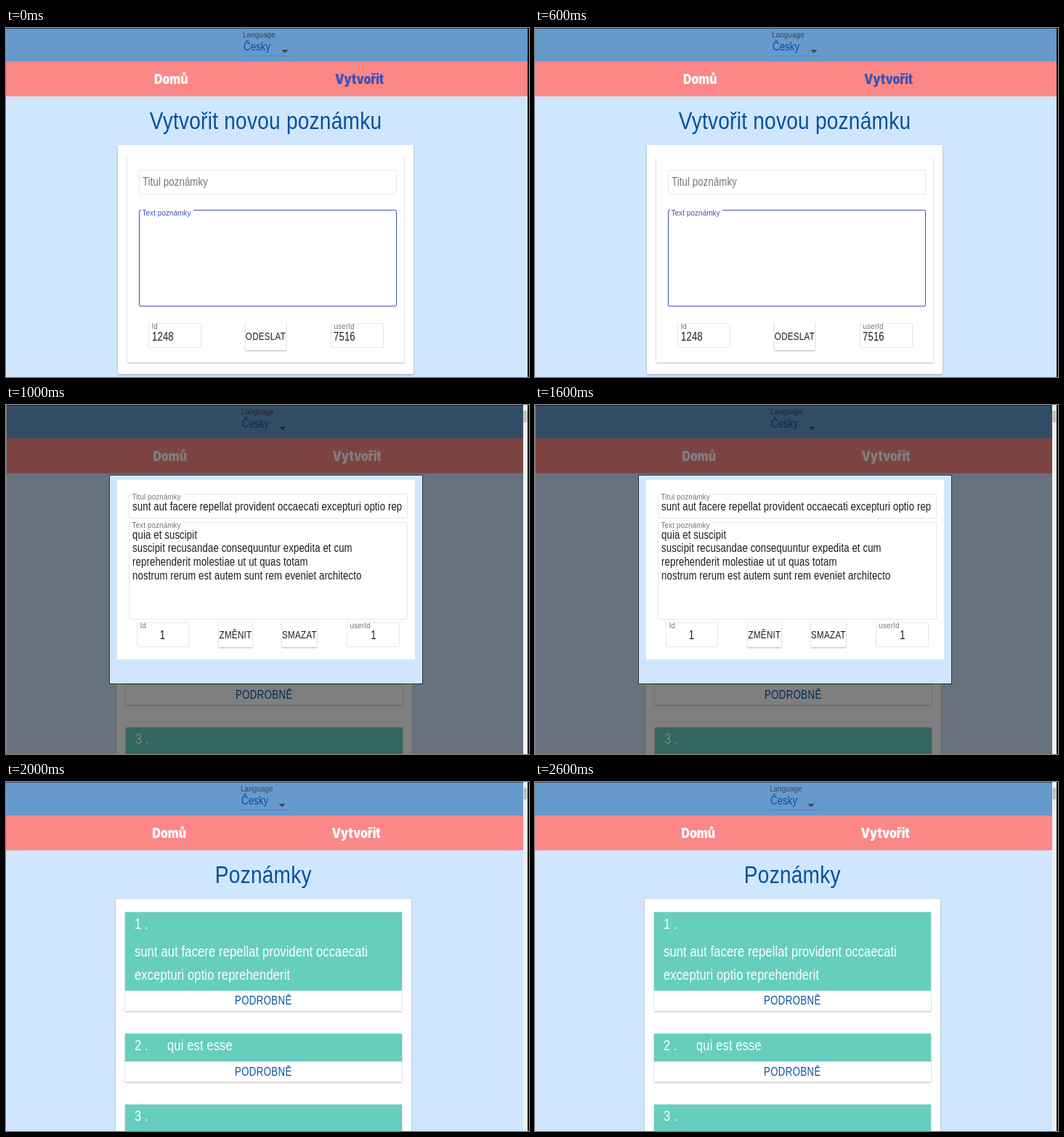
Write an HTML page that moves like this. It is 720 px wide and 480 px high and loops after 3 s.

```html
<!DOCTYPE html>
<html lang="cs">
<head>
<meta charset="utf-8">
<style>
  html, body { margin: 0; width: 100%; height: 100%; overflow: hidden; }
  svg { display: block; font-family: "Liberation Sans", Arial, sans-serif; }
  text { letter-spacing: .009em; white-space: pre; }
  .nav { font-family: Inter, sans-serif; font-weight: 900; letter-spacing: 0; }
  .button { letter-spacing: .0286em; }
  .mid { text-anchor: middle; }
  .paper { filter: drop-shadow(0 1px .8px rgba(0, 0, 0, .3)); }
</style>
</head>
<body>
<svg id="stage" width="720" height="480" viewBox="0 0 720 480"></svg>
<script>
const SKY = '#d0e6fe', BLUE = '#07519c', INDIGO = '#3f51b5', GREEN = '#66cebc';
const INK = '#1c1c1c', GRAY = '#757575', LINE = '#e6e6e6';

const rect = (x, y, w, h, fill, extra = '') =>
  `<rect x="${x}" y="${y}" width="${w}" height="${h}" fill="${fill}" ${extra}/>`;
const paper = (x, y, w, h) => rect(x, y, w, h, '#fff', 'class="paper"');

// The page is shown slightly narrowed, so all type shares one scale.
const text = (x, y, str, size, fill, cls = '') =>
  `<text transform="translate(${x} ${y}) scale(.825 .98)" font-size="${size}" fill="${fill}" class="${cls}">${str}</text>`;

function field(x, y, w, h, label = '', labelWidth = 0, color = LINE, labelColor = GRAY) {
  return rect(x + .5, y + .5, w - 1, h - 1, 'none', `stroke="${color}" rx="1.5"`) +
    (label && rect(x + 3, y - 1, labelWidth, 3, '#fff') + text(x + 4.5, y + 8, label, 12, labelColor));
}

const button = (x, y, w, h, label) =>
  paper(x, y, w, h) + text(x + w / 2, y + h / 2 + 5, label, 14, INK, 'button mid');

function header(width, langX, arrowX, homeX, createX, createColor) {
  return rect(0, 0, 720, 480, SKY) +
    rect(0, 0, width, 46, '#6699cc') + rect(0, 46, width, 48, '#fb8787') +
    rect(0, 0, 720, 1, '#30445a') +
    text(langX, 12.5, 'Language', 12, '#3c4650') +
    text(langX + 1, 30.5, 'Česky', 16, BLUE) +
    `<path d="M${arrowX - 4.5} 30h9l-4.5 4.5z" fill="#3c4650"/>` +
    rect(langX - 1, 38, 70, 1, '#5a87b4') +
    text(homeX, 76.5, 'Domů', 19.2, '#fff', 'nav') +
    text(createX, 76.5, 'Vytvořit', 19.2, createColor, 'nav');
}

const heading = (x, str) => text(x, 139, str, 34, BLUE, 'mid');
const edge = rect(718, 0, 2, 480, '#0c0c0c');
const scrollbar = rect(712, 0, 6, 480, '#f1f1f1') + rect(712.5, 8, 5, 16, '#c1c1c1');

const createPage = header(718, 326, 384, 204, 453, INDIGO) +
  heading(357.5, 'Vytvořit novou poznámku') +
  paper(154, 161, 407, 315) + paper(167, 177, 381, 283) +
  field(183, 195, 355, 34) + text(188, 216.5, 'Titul poznámky', 16, GRAY) +
  field(183, 250, 355, 133, 'Text poznámky', 72, INDIGO, INDIGO) +
  field(196, 406, 73, 34, 'Id', 12) + text(201, 429.5, '1248', 16, INK) +
  button(329.5, 404, 56, 39, 'ODESLAT') +
  field(447, 406, 73, 34, 'userId', 32) + text(451, 429.5, '7516', 16, INK);

const note = (y, h, buttonHeight = 28) =>
  paper(164, y, 381, h + buttonHeight) + rect(164, y, 381, h, GREEN) +
  text(354.3, y + h + 19, 'PODROBNĚ', 16, BLUE, 'button mid');
const noteText = (x, y, str) => text(x, y, str, 20, '#fff');

const notesPage = header(720, 323, 380, 201.5, 448.5, '#fff') +
  heading(354.3, 'Poznámky') +
  rect(151, 161, 407, 330, '#fff', 'class="paper"') +
  note(179, 108) + note(346, 38.5) + note(443.5, 108) +
  noteText(177, 202, '1 .') +
  noteText(177, 240, 'sunt aut facere repellat provident occaecati') +
  noteText(177, 272, 'excepturi optio reprehenderit') +
  noteText(177, 369, '2 .') + noteText(222, 369, 'qui est esse') +
  noteText(177, 466, '3 .');

const noteBody = ['quia et suscipit',
  'suscipit recusandae consequuntur expedita et cum',
  'reprehenderit molestiae ut ut quas totam',
  'nostrum rerum est autem sunt rem eveniet architecto'];

const dialog = rect(142.5, 96.5, 431, 287, SKY, 'stroke="#2b3037"') +
  rect(153, 103, 410, 247, '#fff') +
  field(169, 122, 384, 34, 'Titul poznámky', 71) +
  text(174, 144.5, 'sunt aut facere repellat provident occaecati excepturi optio rep', 16, INK) +
  field(169, 161, 384, 134, 'Text poznámky', 71) +
  noteBody.map((line, i) => text(174, 183.5 + i * 18.7, line, 16, INK)).join('') +
  field(180, 299, 72, 34, 'Id', 12) + text(215.5, 322, '1', 16, INK, 'mid') +
  button(293, 299, 46, 34, 'ZMĚNIT') + button(380, 299, 48, 34, 'SMAZAT') +
  field(469, 299, 73, 34, 'userId', 32) + text(506, 322, '1', 16, INK, 'mid');

const scenes = [
  createPage + edge,
  `<g transform="translate(1)">${notesPage}</g>` +
    rect(0, 0, 713, 480, 'rgba(0,0,0,.5)') + scrollbar + edge + dialog,
  notesPage + scrollbar + edge
];

const stage = document.getElementById('stage');
stage.innerHTML = scenes.map(scene => `<g>${scene}</g>`).join('');

function draw() {
  const current = Math.floor(performance.now() % 3000 / 1000);
  [...stage.children].forEach((group, i) => group.style.display = i === current ? '' : 'none');
  requestAnimationFrame(draw);
}
draw();
</script>
</body>
</html>
```
